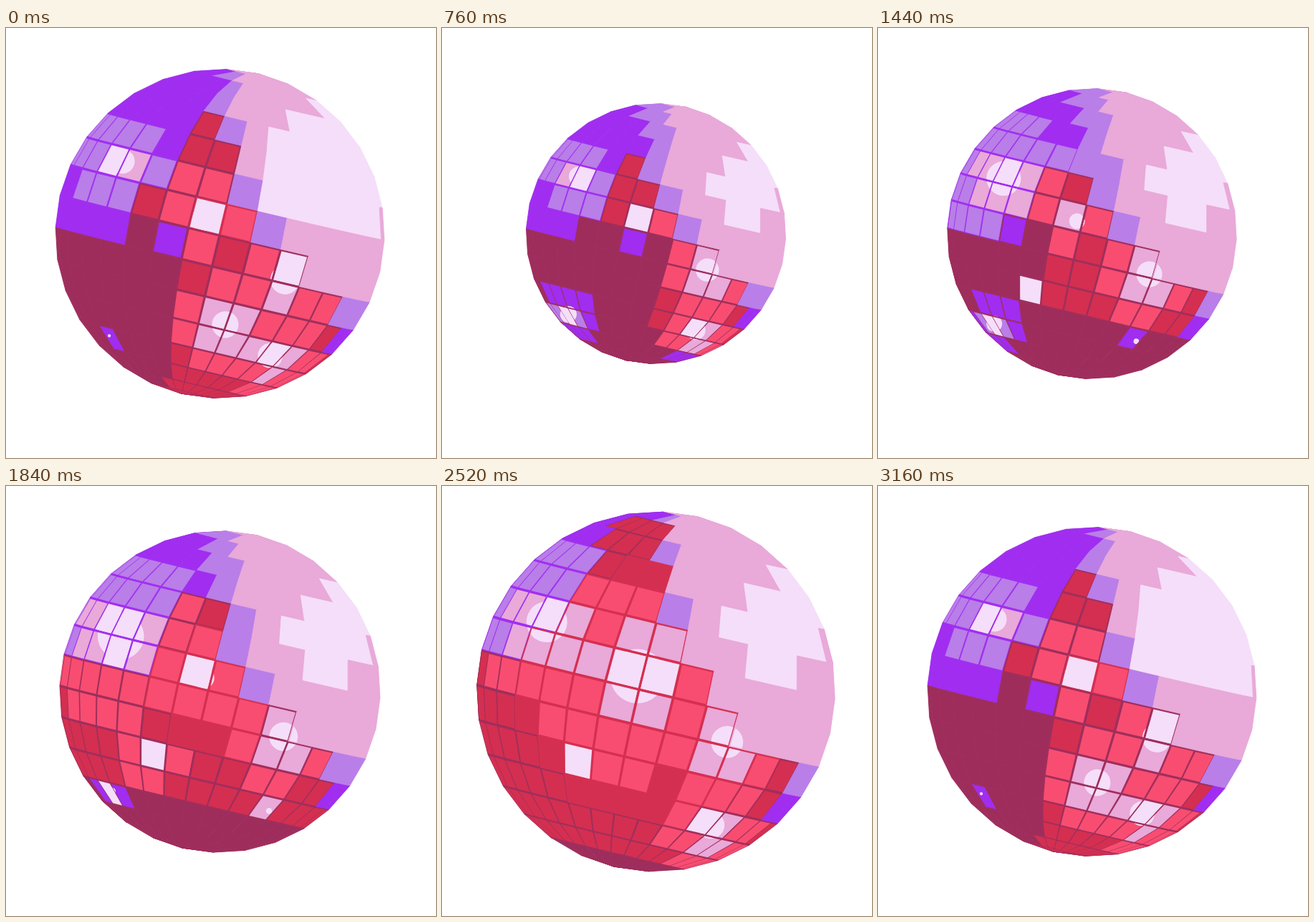
An HTML page with a canvas that plays this animation: 600x600 px, repeating every 3.2 s.

```html
<!DOCTYPE html>
<html>
<head>
<meta charset="utf-8">
<style>
html, body { margin: 0; width: 100%; height: 100%; overflow: hidden; background: #fff; }
canvas { display: block; width: 600px; height: 600px; }
</style>
</head>
<body>
<canvas id="stage" width="600" height="600"></canvas>
<script>
const ctx = document.getElementById('stage').getContext('2d');
const LOOP = 3200, TURN = 3160, STEP = 40;
const CENTER_X = 298.5, CENTER_Y = 287, TILT = 0.235, PITCH = 0.01;
const COLUMNS = 32, ROWS = 16, INSET = 0.038;
const COLORS = {
  maroon: '#9e2d5c', red: '#d42f50', hot: '#f84d70', violet: '#a02df0',
  lavender: '#b97ee8', pink: '#e9a9d9', pale: '#f5def9'
};

// Each zone lists its colours from unlit to brightest.
const ZONES = {
  dark: ['maroon', 'violet', 'lavender', 'pale'],
  warm: ['red', 'hot', 'pink', 'pale'],
  cold: ['violet', 'lavender', 'pink', 'pale'],
  band: ['lavender', 'lavender', 'pink', 'pale'],
  sky: ['pink', 'pink', 'pink', 'pale'],
  glare: ['pale', 'pale', 'pale', 'pale']
};

const ZOOM = [[0, 229.5], [400, 220.5], [760, 181.5], [1440, 202.5], [2000, 232.5], [2520, 251], [2800, 246.5]];

function zoomAt(t) {
  const n = ZOOM.length;
  const key = i => {
    const lap = Math.floor(i / n), [at, r] = ZOOM[i - lap * n];
    return [at + lap * TURN, r];
  };
  const slope = i => (key(i + 1)[1] - key(i - 1)[1]) / (key(i + 1)[0] - key(i - 1)[0]);
  let i = n - 1;
  while (ZOOM[i][0] > t) i--;
  const [t0, a] = key(i), [t1, b] = key(i + 1), span = t1 - t0, u = (t - t0) / span;
  return a + (b - a) * u * u * (3 - 2 * u) + span * u * (1 - u) * (slope(i) * (1 - u) - slope(i + 1) * u);
}

// A smooth periodic pulse, 1 at its peak and 0 beyond its width.
function pulse(t, peak, width) {
  const away = Math.abs(t - peak), d = Math.min(away, TURN - away);
  return d < width ? Math.cos(Math.PI / 2 * d / width) ** 2 : 0;
}
const softPulse = (t, peak, width) => Math.sqrt(pulse(t, peak, width));

// Positions are in ball radii, with the spin axis vertical.
function sceneAt(t) {
  const glow = pulse(t, 2520, 900), flood = pulse(t, 2150, 900);
  const halo = pulse(t, 1950, 1200);
  return {
    glow, flood,
    bandWidth: 0.05 + 0.18 * softPulse(t, 1100, 1300),
    glare: 0.27 + 0.15 * pulse(t, 0, 600),
    warmTop: -1 + 0.6 * softPulse(t, 1400, 1200),
    warmBottom: 1 - 0.4 * pulse(t, 1560, 1300),
    warmLeft: -0.13 + 0.3 * pulse(t, 760, 700) - 1.6 * flood,
    lights: [
      { u: -0.68, v: -0.29 + 0.1 * halo, reach: 0.28 + 0.26 * halo },
      { u: -0.12, v: -0.06, reach: 0.2 + 0.36 * glow },
      { u: 0.45, v: 0.18, reach: 0.33 },
      { u: 0.47, v: 0.65, reach: 0.28 * (1 - pulse(t, 1640, 600)) },
      { u: -0.51, v: 0.76, reach: 0.25 * softPulse(t, 1000, 1100) },
      { u: -0.31, v: 0.49, reach: 0.2 * softPulse(t, 2000, 900) },
      { u: 0.16, v: 0.53, reach: 0.3 * pulse(t, 0, 350) }
    ]
  };
}

function zoneAt(u, v, scene) {
  const skyEdge = -0.12 + 0.5 * (1 + v) ** 2;
  if (v > 0.19) {
    if (u > 0.8 && v < 0.55) return v < 0.38 ? 'band' : 'cold';
  } else if (u > skyEdge && (v < 0 || u > 0.55)) {
    return Math.hypot(u - 0.57, v + 0.51) < scene.glare ? 'glare' : 'sky';
  }
  if (v < 0) {
    if (u > skyEdge - scene.bandWidth) return 'band';
    const warmEdge = -0.5 - 0.4 * v - 0.25 * scene.glow;
    return u > warmEdge && v > scene.warmTop ? 'warm' : 'cold';
  }
  if (u > scene.warmLeft && v < scene.warmBottom) return 'warm';
  return v < 0.19 && u < -0.55 ? 'cold' : 'dark';
}

function shade(u, v, scene) {
  const zone = zoneAt(u, v, scene), ramp = ZONES[zone];
  const ratio = Math.max(...scene.lights.map(l => l.reach / Math.hypot(u - l.u, v - l.v)));
  const level = ratio > 4 ? 3 : ratio > 2 ? 2 : ratio > 1 ? 1 : 0;
  const lift = Math.max(scene.glow * 0.75, scene.flood * 0.55);
  const softGap = Math.hypot(u, v) < lift;
  return { color: ramp[level], gap: zone === 'warm' && !softGap ? 'maroon' : ramp[0] };
}

function vertex(column, row, spin) {
  const lon = (column + spin) * 2 * Math.PI / COLUMNS, lat = row * Math.PI / ROWS;
  const ring = Math.sin(lat);
  return [ring * Math.sin(lon), -Math.cos(lat) + PITCH * ring * Math.cos(lon)];
}

const mix = (a, b, k) => [a[0] + (b[0] - a[0]) * k, a[1] + (b[1] - a[1]) * k];

function inset([a, b, c, d]) {
  const corner = (p, beside, across, opposite) =>
    mix(mix(p, beside, INSET), mix(across, opposite, INSET), INSET);
  return [corner(a, b, d, c), corner(b, a, c, d), corner(c, d, b, a), corner(d, c, a, b)];
}

function outline(corners) {
  const path = new Path2D();
  corners.forEach(([x, y], i) => path[i ? 'lineTo' : 'moveTo'](x, y));
  path.closePath();
  return path;
}

function visibleTiles(spin, scene) {
  const tiles = [];
  for (let row = 0; row < ROWS; row++) for (let column = 0; column < COLUMNS; column++) {
    const quad = [[0, 0], [1, 0], [1, 1], [0, 1]].map(([i, j]) => vertex(column + i, row + j, spin));
    const [a, b, c, d] = quad;
    const facing = (c[0] - a[0]) * (d[1] - b[1]) - (c[1] - a[1]) * (d[0] - b[0]);
    if (facing <= 1e-6) continue;
    const [u, v] = mix(mix(a, c, 0.5), mix(b, d, 0.5), 0.5);
    tiles.push({ body: outline(quad), face: outline(inset(quad)), ...shade(u, v, scene) });
  }
  return tiles;
}

function draw(t) {
  const r = zoomAt(t), scene = sceneAt(t);
  const tiles = visibleTiles(t / TURN * COLUMNS, scene);
  const faces = new Path2D();

  ctx.fillStyle = '#fff';
  ctx.fillRect(0, 0, 600, 600);
  ctx.save();
  ctx.translate(CENTER_X, CENTER_Y);
  ctx.rotate(TILT);
  ctx.scale(r, r);
  ctx.lineWidth = 0.8 / r;
  for (const { body, gap } of tiles) {
    ctx.fillStyle = ctx.strokeStyle = COLORS[gap];
    ctx.fill(body);
    ctx.stroke(body);
  }
  for (const { face, color, gap } of tiles) {
    faces.addPath(face);
    if (color === gap) continue;
    ctx.fillStyle = COLORS[color];
    ctx.fill(face);
  }
  ctx.clip(faces);
  ctx.fillStyle = COLORS.pale;
  for (const { u, v, reach } of scene.lights) {
    ctx.beginPath();
    ctx.arc(u, v, reach * 0.27, 0, 2 * Math.PI);
    ctx.fill();
  }
  ctx.restore();
}

const start = performance.now();
function tick() {
  const t = (performance.now() - start) % LOOP;
  draw(Math.floor(t / STEP) * STEP % TURN);
  requestAnimationFrame(tick);
}
tick();
</script>
</body>
</html>
```
